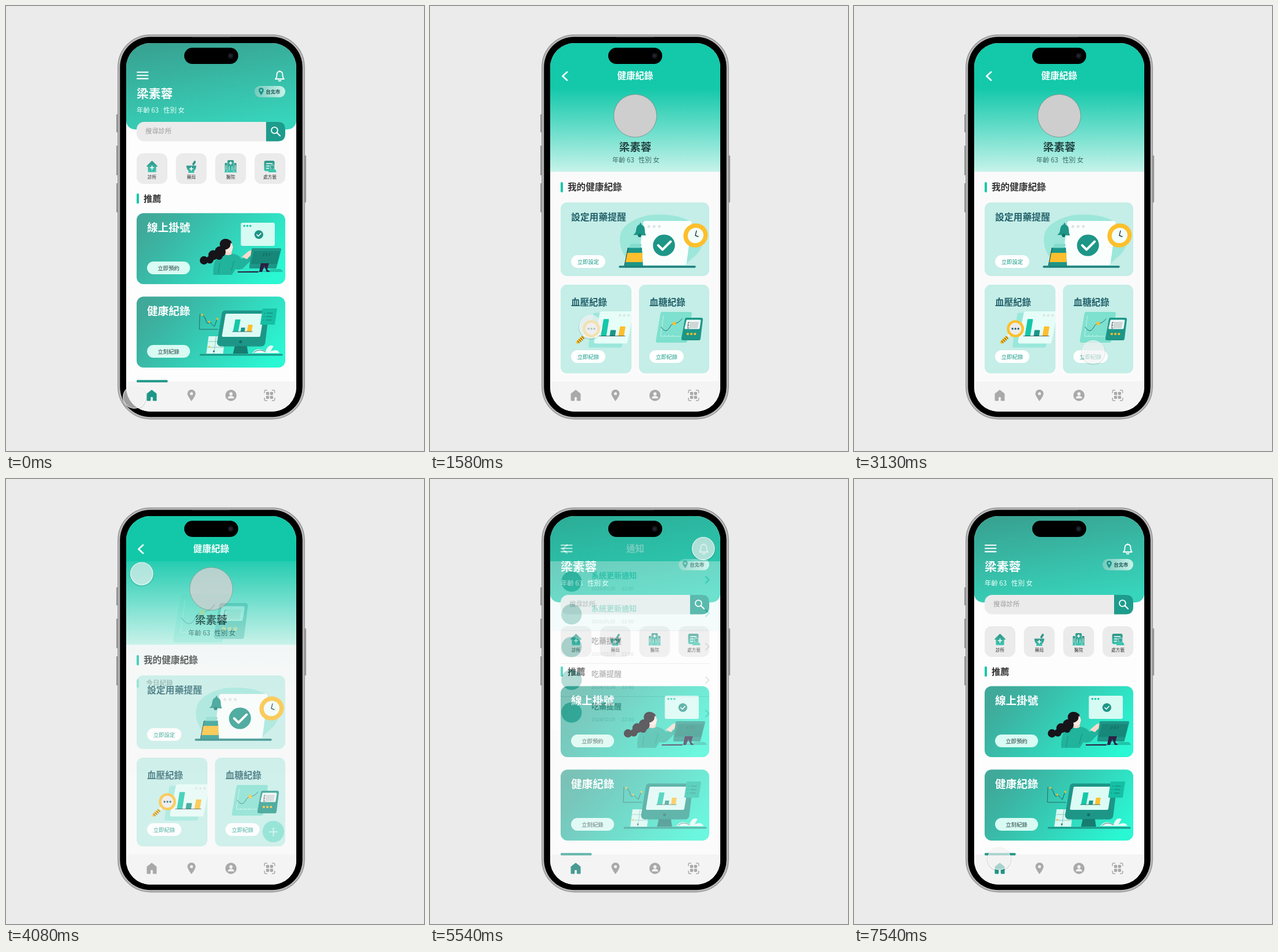
Animation, 720 px wide and 768 px high, one loop 7.58 s. Source, as an HTML page:

```html
<!DOCTYPE html>
<html lang="zh-Hant">
<head>
<meta charset="utf-8">
<title>健康紀錄</title>
<style>
html, body { margin: 0; width: 100%; height: 100%; overflow: hidden; background: #ebebeb }
svg { display: block; width: 720px; height: 768px }
text { font-family: "Noto Sans CJK TC", "Noto Sans CJK", "Noto Sans CJK JP", sans-serif; white-space: pre }
text.num { font-family: Inter, "Noto Sans", sans-serif }
</style>
</head>
<body>
<svg viewBox="0 0 720 768">
<defs>
  <linearGradient id="head" x1=".35" y1="0" x2=".65" y2="1"><stop stop-color="#38a090"/><stop offset="1" stop-color="#37d5bc"/></linearGradient>
  <linearGradient id="card" x1="0" y1=".3" x2="1" y2=".7"><stop stop-color="#40a999"/><stop offset=".2" stop-color="#3bb5a4"/><stop offset="1" stop-color="#2af7d3"/></linearGradient>
  <linearGradient id="pill"><stop stop-color="#74cabc"/><stop offset="1" stop-color="#c9f3ea"/></linearGradient>
  <linearGradient id="icon" x2="0" y2="1"><stop stop-color="#2f9587"/><stop offset="1" stop-color="#3fc4b0"/></linearGradient>
  <linearGradient id="profile" x2="0" y2="1"><stop offset=".35" stop-color="#14c8aa"/><stop offset=".65" stop-color="#62dcc8"/><stop offset="1" stop-color="#c6f3ea"/></linearGradient>
  <linearGradient id="hero" x2="0" y2="1"><stop stop-color="#5fdac8"/><stop offset=".35" stop-color="#a9e9df"/><stop offset=".7" stop-color="#dff1ee"/><stop offset="1" stop-color="#f4f4f4"/></linearGradient>
  <clipPath id="screen"><rect x="207" y="64" width="293" height="636" rx="42"/></clipPath>
  <clipPath id="small"><rect x="225" y="481" width="122" height="153" rx="11"/></clipPath>
</defs>
<g fill="#999">
  <path d="M190 187h4v31h-4zM190 241h4v51h-4zM190 306h4v50h-4zM513 258h4v81h-4z"/>
  <rect x="192.8" y="49.8" width="321.4" height="663" rx="56" fill="#b9b9b9" stroke="#8e8e8e" stroke-width="1.2"/>
  <rect x="196.3" y="53.3" width="314.4" height="656" rx="52" fill="#000"/>
  <path d="M321 53.800h65" stroke="#444"/>
</g>
<g id="pages" clip-path="url(#screen)"></g>
<rect x="307" y="72" width="93" height="28" rx="14"/>
<circle cx="387" cy="86" r="4.8" fill="#17181e"/><circle cx="387" cy="86" r="2" fill="#262a3a"/>
<g id="cursor">
  <circle cy="1.2" r="20.2" fill="none" stroke="#000" stroke-opacity=".09" stroke-width="2"/>
  <circle r="19.3" fill="#f2f2f2" fill-opacity=".66" stroke="#fff" stroke-opacity=".8" stroke-width="1.2"/>
</g>
</svg>
<script>
const TEAL = '#14c8aa', DARK = '#1d9687', YELLOW = '#fdbf2d', INK = '#22606a', NAME = '梁素蓉';
const $ = id => document.getElementById(id);

// Drawing helpers return SVG markup.
const text = (x, y, size, s, fill, weight = 700, anchor = 'start', cls = '') =>
  `<text class="${cls}" x="${x}" y="${y}" font-size="${size}" fill="${fill}" font-weight="${weight}" text-anchor="${anchor}">${s}</text>`;
const mid = (x, y, size, s, fill, weight) => text(x, y, size, s, fill, weight, 'middle');
const num = (x, y, size, s) => text(x, y, size, s, '#a0a0a0', 400, 'start', 'num');
const rect = (x, y, w, h, fill, r = 0) => `<rect x="${x}" y="${y}" width="${w}" height="${h}" rx="${r}" fill="${fill}"/>`;
const dot = (x, y, r, fill) => `<circle cx="${x}" cy="${y}" r="${r}" fill="${fill}"/>`;
const dots = (x, y, gap, r, fill) => [0, 1, 2].map(i => dot(x + i * gap, y, r, fill)).join('');
const shape = (d, fill) => `<path d="${d}" fill="${fill}"/>`;
const soft = (d, fill, w) => `<path d="${d}" fill="${fill}" stroke="${fill}" stroke-width="${w}" stroke-linejoin="round"/>`;
const line = (d, stroke, w = 1) =>
  `<path d="${d}" fill="none" stroke="${stroke}" stroke-width="${w}" stroke-linecap="round" stroke-linejoin="round"/>`;
const at = (x, y, s) => `<g transform="translate(${x} ${y})">${s}</g>`;
const heading = (y, h, x, size, s, base) => rect(225, y, 4, h, TEAL, 1.5) + text(x, base, size, s, '#333');
const back = line('M236 114l-7.5 7 7.5 7', '#fff', 2.8);
const topBar = title => rect(207, 64, 293, 78, TEAL) + back + mid(353.5, 125.8, 15.5, title, '#fff');
const pin = (x, y, k, fill, hole) => at(x, y, `<g transform="scale(${k})">` +
  shape('M0 10C-4 5-7-1-7-3a7 7 0 0 1 14 0c0 2-3 8-7 13z', fill) + dot(0, -3, 2.6, hole) + '</g>');

function nav(active, bg = '#f4f4f4') {
  const grey = '#a9a9a9';
  return rect(207, 648, 293, 52, bg) +
    at(251, 672, soft('M-7.5-2.5L0-8.5l7.5 6V8.5h-4.7V2h-5.6v6.5h-4.7z', active ? DARK : grey, 2)) +
    pin(319.5, 672, 1, grey, bg) +
    at(387.5, 672, dot(0, 0, 9.7, grey) + dot(0, -2.7, 2.8, bg) + shape('M-5.5 5.2c0-6 11-6 11 0z', bg)) +
    at(454, 672, line('M-8.8-4.5V-7q0-2 2-2h2.3M4.5-9h2.3q2 0 2 2v2.5M8.8 4.5V7q0 2-2 2H4.5M-4.5 9h-2.3q-2 0-2-2V4.5', grey, 1.5) +
      [[-6, -6], [.8, -6], [-6, .8], [.8, .8]].map(p => rect(...p, 5.2, 5.2, grey, 1)).join(''));
}

function deskWorker() {
  const hair = '#161419';
  return rect(404.5, 374, 58.5, 40, '#d5fbf3', 3) + dots(410.5, 379.5, 5.2, 1.8, TEAL) +
    dot(435.5, 394.5, 7.6, DARK) + line('M432 394.5l2.7 2.8 4.6-5', '#fff', 1.6) +
    shape('M398 459h79q-2-6-8-5-14-2-18 3-30-1-53 2z', '#20c5a9') +
    shape('M357 464q-1-24 9-31 8-7 20-6 15 1 20 10l11-8 7 8-16 16q-6 3-13 1l-6 10z', '#21b39c') +
    shape('M376 418l12 4 1 6q-6 4-14 0z', '#fbd9cc') +
    shape('M374 405q12-6 15 4l2 7-2 8q-6 3-11-1z', '#fde8df') +
    dot(377.5, 411, 9.3, hair) + shape('M370 406q9-8 18 0l1 4q-7-3-8 4-1 8-8 8z', hair) +
    dot(369, 424, 9.5, hair) + dot(357, 430, 8.5, hair) + dot(367, 432, 6, hair) + dot(351, 438, 6.5, hair) + dot(341, 439, 7.2, hair) +
    line('M366 462l2-18M393 440l-5 17', '#168f7e', .9) +
    shape('M406 433l12-10 8-3-2 7-9 10z', '#fbd9cc') +
    soft('M425 420h47l-8 31h-43z', DARK, 4) + shape('M427 423h45l-5 22h-45z', '#168779') +
    shape('M439 444h14l-3 10 5 5h-6l-4-10-4 10h-5z', '#2b2145') +
    line('M400 459h34', '#2b2145', 2) + line('M443 431l2-4m3 4l2-4m3 4l2-4', '#0d5b52', 1);
}

function bigScreen() {
  return line('M334 532l-1 26h32', '#20534e', .8) + line('M338 533q5 3 7 12 3 6 6 0 6 7 8 8l5-14', '#20534e', .9) +
    dot(338, 533, 1.8, YELLOW) + dot(350, 545, 1.8, YELLOW) + dot(364, 540, 1.8, YELLOW) +
    shape('M349 570h28l-3 30h-29z', '#d9faf3') + line('M349 579h27M347 589h28M362 570l-4 30', '#76b8ad', .8) +
    dot(358, 596, 1.4, INK) + dot(350, 588, 1.4, YELLOW) +
    soft('M378 532h68l-6 49h-70z', DARK, 13) + soft('M380 533h62l-6 36h-62z', '#dcfbf5', 4) +
    shape('M395 541h9l-4 21h-9z', TEAL) + shape('M405 555h7l-1 7h-7z', DARK) + shape('M417 550h8l-2 12h-8z', YELLOW) +
    line('M390 562h34', '#20534e', .8) + dot(404, 579.5, 2.5, '#126c62') +
    shape('M394 587h21l2 13h-26z', '#167d71') + soft('M443 523h23l-4 26h-23z', '#16bfa4', 2) +
    line('M450 530h9m-10 6h9m-10 6h9M445 530h1m-2 6h1m-2 6h1', '#127a6e', 1) +
    shape('M424 599q9-12 23-3 5-14 14-9-3 4-5 9 12-5 15 3z', '#e4fbf6') + line('M427 598q9-8 20-1', '#20534e', .8) +
    line('M335 602h140', DARK, 3);
}

function feature(y, title, label, art) {
  return rect(225, y, 256, 122.5, 'url(#card)', 12) + text(243, y + 31.5, 18.6, title, '#fff') +
    rect(243, y + 83.5, 74, 22, '#d8fbf3', 11) + mid(280, y + 98, 9.4, label, '#23403c', 500) + art;
}

function home() {
  const g = 'url(#icon)', bg = '#ebebeb';
  const plus = (x, y, r, c = '#fff') => line(`M${x - r} ${y}h${2 * r}M${x} ${y - r}v${2 * r}`, c, 1.6);
  const tiles = [
    ['診所', soft('M0-9L8.8-.5H6.300v9.500H-6.300v-9.500h-2.500z', g, 1.4) + plus(0, 2, 3.2)],
    ['藥局', shape('M-8.5-1.500h17q0 6-4 9.500l1 3h-11l1-3q-4-3.500-4-9.500z', g) + line('M3.5-4l2.500-4', '#2f9587', 3.6) + plus(0, 4, 2.8)],
    ['醫院', rect(-5.5, -11, 11, 20, g, 2) + rect(-10, -6, 4, 15, g, 1) + rect(6, -6, 4, 15, g, 1) +
      line('M-10 9.5h20', '#3fc4b0', 1.5) + plus(0, -6, 2.2) + line('M-2.5 0v6M2.5 0v6M-8-2v7M8-2v7', bg, 1)],
    ['處方籤', rect(-10, -10, 18, 18, g, 3) + line('M-6-5h10M-6-1h5M-6 3h4', '#fff', 1.4) +
      dot(4.5, 1, 4, bg) + dot(4.5, 1, 3.2, '#35aa99') + shape('M-3 10q1-6 7.5-6t6.5 6z', '#3fc4b0')]
  ];
  return rect(207, 64, 293, 636, '#fdfdfd') + rect(207, 50, 293, 163, 'url(#head)', 15) +
    line('M226 114.2h18.5m-18.5 5.6h18.5m-18.5 5.6h18.5', '#fff', 2.1) +
    line('M464 126q2.5-2 2.5-7 0-6 5-6t5 6q0 5 2.5 7zM469.5 128.5q2 1.8 4 0M471.5 112v1', '#fff', 1.8) +
    text(225, 158.5, 20.8, NAME, '#fff') + text(225, 184, 11.4, '年齡 63', '#eafffa', 500) + text(271, 184, 11.4, '性別 女', '#eafffa', 500) +
    rect(428, 138, 53, 19.5, 'url(#pill)', 9.7) + pin(439.5, 147.5, .65, DARK, '#8ad5c8') + text(447.5, 151, 8.3, '台北市', '#174f4a') +
    rect(225, 200, 256, 33.5, bg, 13) + shape('M448 200h20q13 0 13 13v7.5q0 13-13 13h-20z', '#1d9c8c') +
    '<circle cx="462.5" cy="214.5" r="5.4" fill="none" stroke="#fff" stroke-width="1.9"/>' + line('M466.5 218.5l5.5 5.5', '#fff', 2.2) +
    text(240, 220.3, 11.3, '搜尋診所', '#9b9b9b', 400) +
    tiles.map(([label, art], i) => {
      const x = 225 + i * 67.7;
      return rect(x, 254, 53, 53, bg, 12) + at(x + 26.5, 277, art) + mid(x + 26.5, 298.3, 7.6, label, '#333', 500);
    }).join('') +
    heading(323.5, 17.5, 237, 15.3, '推薦', 338) +
    feature(357.5, '線上掛號', '立即預約', deskWorker()) + feature(501.5, '健康紀錄', '立刻紀錄', bigScreen()) +
    nav(true) + rect(225, 645.5, 53.5, 4, DARK, 1.5);
}

function reminderArt() {
  return shape('M327 402q0-29 49-41 60-6 86 22 17 22-2 45l-20 18H350q-23-17-23-44z', '#9ce6da') +
    soft('M371 375h76l-9 68h-75z', '#fafffe', 8) + dots(377, 380.5, 9, 2.5, '#dce5e2') +
    `<ellipse cx="403" cy="413" rx="19" ry="18.5" fill="${DARK}" transform="rotate(-20 403 413)"/>` +
    line('M393 413l7.5 7.5 14-14', '#fff', 4) +
    shape('M350 395q5-3 5-9 1-8 6-9l1-3q2 0 2 3 6 2 6 10 0 5 2 9z', DARK) + dot(361, 396, 3, '#14766c') +
    shape('M341 417h24l2 33h-32z', DARK) + shape('M339 426h27v16h-30z', YELLOW) +
    soft('M346 412h17l-1 4h-17z', '#83dccd', 3) + line('M341 418l-6 30', '#17373a', 1) +
    line('M327 450h129', '#1d7f7c', 3.6) +
    `<ellipse cx="457.5" cy="396" rx="17.5" ry="16.8" fill="#f2fffb" stroke="${YELLOW}" stroke-width="7.5" transform="rotate(-35 457.5 396)"/>` +
    line('M459 388l-2 8 5 2', '#20393a', 1.4);
}

// Chart window with a magnifier centred on the origin.
function pressureArt() {
  return at(-317, -238.5,
    soft('M327 200h84l-15 85h-82z', '#9be7db', 10) + soft('M345 196h81l-15 78h-82z', '#e6fdf8', 10) +
    dots(395.5, 202, 11.5, 3.7, '#dbe8e5') +
    soft('M352 214h11l-7 43h-11z', TEAL, 4) + soft('M371 244h11l-2 13h-11z', DARK, 4) + soft('M397 234h11l-4 23h-11z', YELLOW, 4) +
    line('M339 258.3h70', '#20393a', 1.2) +
    line('M300 256l-7 7', '#f3f3f3', 7) + line('M293 263l-13 12', YELLOW, 9) +
    line('M291 260l6 6m-10-2l6 6m-10-2l6 6m-10-2l5 5', '#302b28', 1.5) +
    `<circle cx="317" cy="238.5" r="20" fill="#ececec" stroke="${YELLOW}" stroke-width="7"/>` + dots(309, 238.5, 8, 2.7, INK));
}

// Curve panel with a meter, centred on the origin.
function sugarArt() {
  return at(-430, -555,
    soft('M400 531h48l-8 47h-48z', '#7ee0ce', 6) +
    line('M402 535l-5 35h35M404 570v-2m7 2v-2m7 2v-2', '#c9f5ec', .9) + line('M398 554q8 12 14 2 4-8 9-8 8-1 13-8', INK, .9) +
    dot(420.5, 548, 3, YELLOW) +
    soft('M442 541h25l-4 33h-27z', DARK, 6) + soft('M443 543h22l-2 13h-23z', '#f1fbf9', 3) +
    shape('M448 545h15l-2 11h-15z', '#cfd8d6') + line('M445 546l-1 10m1-10h2m-3 5h2m-2 5h2', '#333', .8) +
    dots(444, 566, 6.2, 2.1, YELLOW));
}

function health() {
  const button = (x, y, s) => rect(x, y, 59, 22, '#fff', 11) + mid(x + 29.5, y + 14.5, 9.4, s, '#149c88', 500);
  const card = (x, y, w, h) => rect(x, y, w, h, '#c4eee7', 11);
  return rect(207, 64, 293, 636, '#fafafa') + rect(207, 64, 293, 222, 'url(#profile)') + back +
    mid(353.5, 125.8, 15.5, '健康紀錄', '#fff') +
    '<circle cx="353.5" cy="189.5" r="37" fill="#cecece" stroke="#6c8b86" stroke-width=".8"/>' +
    mid(353.5, 250, 18.5, NAME, '#20403e') + text(314, 270, 11.3, '年齡 63', '#3d6b66', 400) + text(359, 270, 11.3, '性別 女', '#3d6b66', 400) +
    heading(304, 17.5, 237, 15.6, '我的健康紀錄', 318.3) +
    card(225, 339, 256, 127) + text(243, 370, 15.8, '設定用藥提醒', INK) + reminderArt() + button(243, 430, '立即設定') +
    card(225, 481, 122, 153) + text(243, 516.8, 15.5, '血壓紀錄', INK) +
    `<g clip-path="url(#small)">${at(278, 557, `<g transform="scale(.63)">${pressureArt()}</g>`)}</g>` + button(243, 594, '立即紀錄') +
    card(360, 481, 121, 153) + text(378, 516.8, 15.5, '血糖紀錄', INK) + at(430, 555, sugarArt()) + button(378, 594, '立即紀錄') +
    nav(false);
}

function records(title, art, rows) {
  const cols = [241.5, 303.5, 365.5, 426], labels = ['收縮壓', '舒張率', '心率', '新增時間'];
  return rect(207, 64, 293, 636, '#f4f4f4') + rect(207, 142, 293, 230, 'url(#hero)') + topBar(title) + art +
    heading(345.5, 14.5, 241.5, 11.5, '今日紀錄', 356.3) +
    rows.map((row, r) => at(0, r * 56, cols.map((x, i) =>
      text(x, 390.8, 9.3, labels[i], TEAL) + num(x, 411.3, 9.4, row[i])).join('') + line('M225.5 423.5h256', '#b8b8b8'))).join('') +
    dot(460.5, 608.5, 18.6, TEAL) + line('M454 609h13m-6.5-6.5v13', '#fff', 2) + nav(false);
}

function notices() {
  const dates = ['2025/01/26', '2025/01/25', '2024/12/28', '2024/12/26', '2024/12/25'];
  return rect(207, 64, 293, 636, '#f9f9f9') + topBar('通知') + rect(207, 142, 293, 120, '#dffbf5') + rect(207, 262, 293, 172, '#fdfdfd') +
    line('M225.5 261.8h256m-256 56.7h256m-256 57h256', '#c8cccb') +
    dates.map((date, i) => {
      const y = 176.5 + i * 56.5, fresh = i < 2;
      return dot(243.8, y + .5, 17.6, DARK) +
        text(278, y - 5.3, 13, fresh ? '系統更新通知' : '吃藥提醒', fresh ? '#18bfa5' : '#333') +
        num(278, y + 15.8, 7.6, date) + num(330, y + 15.8, 7.6, '22:00') +
        line(`M475 ${168.5 + i * 57.7}l5.5 5.5-5.5 5.5`, fresh ? TEAL : '#aaa', 2);
    }).join('') + nav(false);
}

const pages = {
  home: home(),
  health: health(),
  pressure: records('血壓紀錄', at(317, 238.5, pressureArt()), [['100', '70', '80', 'a.m.7:00'], ['95', '72', '85', 'p.m.8:00']]),
  sugar: records('血糖紀錄', at(353, 241, `<g transform="scale(1.59)">${sugarArt()}</g>`), []),
  notices: notices()
};
$('pages').innerHTML = Object.entries(pages).map(([id, s]) => `<g id="${id}">${s}</g>`).join('');

const LOOP = 7580, FADE = 160;
const visits = [[-FADE, 'home'], [620, 'health'], [1950, 'pressure'], [2720, 'health'], [3270, 'sugar'],
  [3960, 'health'], [4650, 'home'], [5490, 'notices'], [6340, 'home']];
const moves = [[0, 221, 675], [520, 278, 596], [640, 278, 596], [980, 277, 433], [1120, 277, 433], [1860, 277, 610], [2160, 277, 610],
  [2640, 232, 119], [2740, 232, 119], [3130, 412, 597], [3280, 410, 602], [3850, 232, 119], [3970, 232, 119],
  [4610, 254, 675], [4870, 254, 675], [5420, 471, 120], [5530, 471, 120], [6160, 232, 103], [6360, 232, 105],
  [7540, 250, 655], [LOOP, 221, 675]];

function draw(now) {
  const t = now % LOOP;
  const v = visits.findLastIndex(([start]) => start <= t);
  const [start, id] = visits[v], before = v ? visits[v - 1][1] : id;
  const p = Math.min(1, (t - start) / FADE);
  for (const key in pages) {
    $(key).style.display = key === id || (key === before && p < 1) ? '' : 'none';
    $(key).style.opacity = key === id ? p : 1;
  }
  if ($('pages').lastElementChild !== $(id)) $('pages').append($(id));

  const m = moves.findIndex(([end]) => end > t);
  const [a, x0, y0] = moves[m - 1], [b, x1, y1] = moves[m];
  const u = (t - a) / (b - a), e = u * u * (3 - 2 * u);
  $('cursor').setAttribute('transform', `translate(${x0 + (x1 - x0) * e} ${y0 + (y1 - y0) * e})`);
  requestAnimationFrame(() => draw(performance.now() - origin));
}
const origin = performance.now();
draw(0);
</script>
</body>
</html>
```
